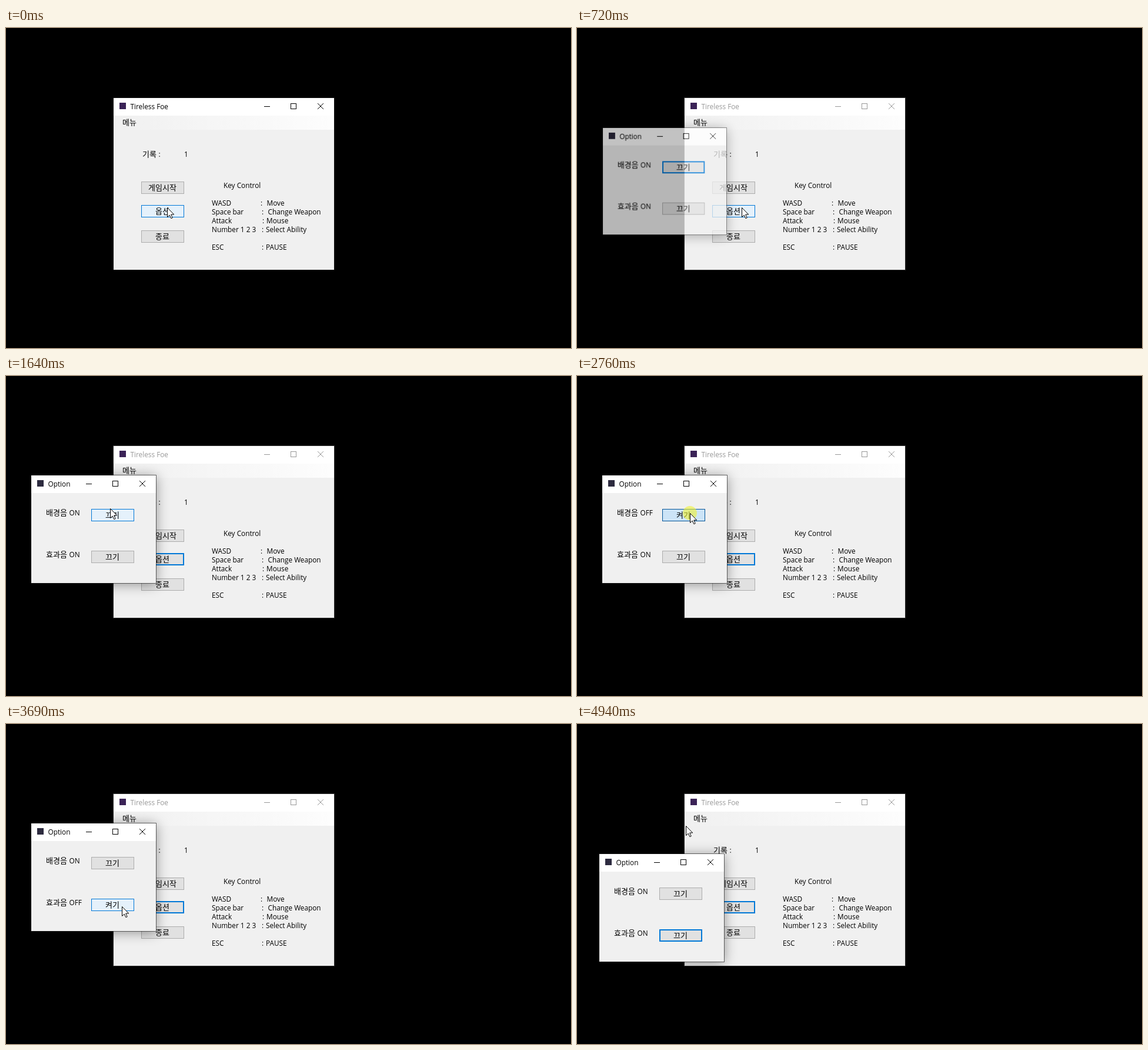
An HTML page with a canvas that plays this animation: 961 by 544 pixels, repeating every 5.01 s.

```html
<!DOCTYPE html>
<html lang="ko">
<head>
<meta charset="utf-8">
<title>Game menu</title>
<style>
html, body { margin: 0; width: 100%; height: 100%; overflow: hidden; background: #000; }
canvas { display: block; }
</style>
</head>
<body>
<canvas id="stage" width="961" height="544"></canvas>
<script>
const W = 961, H = 544, LOOP = 5010;
const stage = document.getElementById('stage');
const screen = stage.getContext('2d');
const layer = Object.assign(document.createElement('canvas'), { width: W, height: H });
const dialog = layer.getContext('2d');

const LATIN = '11.8px "Open Sans", "Noto Sans", sans-serif';
const HANGUL = '13px "Noto Sans CJK KR", "Noto Sans CJK", sans-serif';

// [fill, border, border width]
const BUTTON = {
  normal: ['#e1e1e1', '#adadad', 1],
  focus: ['#e1e1e1', '#0078d7', 2],
  hover: ['#e5f1fb', '#0078d7', 1],
  press: ['#cce4f7', '#005499', 1]
};

const START = {
  x: 274, y: 305, click: false, active: true, option: 'hover',
  alpha: 0, scale: 1, dx: 0, dy: 0,
  music: true, sound: true, musicButton: 'focus', soundButton: 'normal'
};

const at = (x, y, more) => ({ x, y, ...more });

// Each step holds until the next one.
const STEPS = [
  [260, at(276, 305)],
  [340, at(278, 305)],
  [410, at(280, 305)],
  [480, { click: true, option: 'press' }],
  [570, { click: false, option: 'hover' }],
  [650, { active: false, alpha: 0.35, scale: 0.96 }],
  [720, { alpha: 0.76, scale: 0.99 }],
  [800, { alpha: 0.96, scale: 0.998 }],
  [850, { alpha: 1, scale: 1 }],
  [1380, at(268, 300, { option: 'focus' })],
  [1450, at(240, 281)],
  [1510, at(210, 255)],
  [1570, at(186, 232, { musicButton: 'hover' })],
  [1640, at(177, 225)],
  [1710, at(181, 228)],
  [1770, at(187, 232)],
  [1840, at(190, 233)],
  [1910, { click: true, musicButton: 'press' }],
  [1970, { click: false, music: false, musicButton: 'hover' }],
  [2170, at(191, 233)],
  [2370, at(192, 233)],
  [2760, { click: true, musicButton: 'press' }],
  [2900, { click: false, music: true, musicButton: 'hover' }],
  [2960, at(195, 255, { musicButton: 'focus' })],
  [3030, at(197, 275)],
  [3090, at(198, 289)],
  [3230, at(198, 300, { soundButton: 'hover' })],
  [3300, at(197, 310)],
  [3430, { click: true, musicButton: 'normal', soundButton: 'press' }],
  [3550, { click: false, sound: false }],
  [3690, { soundButton: 'hover' }],
  [3750, { click: true, soundButton: 'press' }],
  [3880, { click: false, sound: true, soundButton: 'hover' }],
  [4010, at(190, 292, { soundButton: 'focus' })],
  [4080, at(175, 270)],
  [4140, at(156, 250)],
  [4210, at(138, 232)],
  [4280, at(127, 212)],
  [4340, at(118, 195)],
  [4410, at(113, 186)],
  [4610, { click: true }],
  [4680, at(109, 208, { dx: -4, dy: 22 })],
  [4740, at(107, 230, { dx: -6, dy: 44 })],
  [4800, at(108, 238, { dx: -5, dy: 52 })],
  [4870, at(142, 207, { click: false })],
  [4940, at(185, 173)]
];

function stateAt(time) {
  const state = { ...START };
  for (const [when, change] of STEPS) {
    if (when > time) break;
    Object.assign(state, change);
  }
  return state;
}

function text(c, str, x, y, font = LATIN, color = '#000', align = 'left') {
  c.font = font;
  c.fillStyle = color;
  c.textAlign = align;
  c.fillText(str, x, y);
}

function box(c, color, x, y, w, h) {
  c.fillStyle = color;
  c.fillRect(x, y, w, h);
}

function button(c, label, x, y, mode) {
  const [fill, border, line] = BUTTON[mode];
  box(c, border, x, y, 73, 21);
  box(c, fill, x + line, y + line, 73 - 2 * line, 21 - 2 * line);
  text(c, label, x + 36, y + 15, HANGUL, '#000', 'center');
}

function frame(c, title, x, y, w, h, icon, active, ink) {
  c.save();
  c.shadowColor = 'rgba(0,0,0,.42)';
  c.shadowBlur = 20;
  c.shadowOffsetY = 2;
  box(c, '#f0f0f0', x, y, w, h);
  c.restore();
  box(c, '#fff', x, y, w, 30);
  c.lineWidth = 1;
  c.strokeStyle = active ? 'rgba(20,20,20,.6)' : 'rgba(60,60,60,.75)';
  c.strokeRect(x - 0.5, y - 0.5, w + 1, h + 1);

  box(c, icon, x + 10, y + 8, 11, 11);
  text(c, title, x + 28.5, y + 19, LATIN, ink);

  const right = x + w;
  c.strokeStyle = ink;
  c.strokeRect(right - 73.5, y + 9.5, 9, 9);
  c.beginPath();
  c.moveTo(right - 119, y + 14.5);
  c.lineTo(right - 109, y + 14.5);
  c.moveTo(right - 28, y + 9);
  c.lineTo(right - 18, y + 19);
  c.moveTo(right - 18, y + 9);
  c.lineTo(right - 28, y + 19);
  c.stroke();
}

function drawMain(c, s) {
  frame(c, 'Tireless Foe', 183, 119, 375, 292, '#3b2357', s.active, s.active ? '#000' : '#999');

  const menu = c.createLinearGradient(183, 0, 558, 0);
  menu.addColorStop(0, '#f0f0f0');
  menu.addColorStop(1, '#fdfdfd');
  box(c, menu, 183, 149, 375, 24);
  text(c, '메뉴', 198, 165, HANGUL);

  text(c, '기록', 232, 219, HANGUL);
  text(c, ':', 259.5, 219);
  text(c, '1', 303, 219);

  button(c, '게임시작', 230, 261, 'normal');
  button(c, '옵션', 230, 301, s.option);
  button(c, '종료', 230, 344, 'normal');

  text(c, 'Key Control', 370, 272);
  const keys = [
    ['WASD', 433, 'Move', 443.5, 302],
    ['Space bar', 435, 'Change Weapon', 445.5, 317],
    ['Attack', 436, 'Mouse', 443, 332],
    ['Number 1 2 3', 435, 'Select Ability', 442, 347],
    ['ESC', 435, 'PAUSE', 442, 377]
  ];
  for (const [key, colonX, action, actionX, y] of keys) {
    text(c, key, 350, y);
    text(c, ':', colonX, y);
    text(c, action, actionX, y);
  }
}

function drawSetting(c, label, on, y, mode) {
  text(c, label, 68, y, HANGUL);
  text(c, on ? 'ON' : 'OFF', 107.5, y);
  button(c, on ? '끄기' : '켜기', 145, y - 11, mode);
}

function drawDialog(c, s) {
  c.clearRect(0, 0, W, H);
  c.save();
  c.translate(s.dx, s.dy);
  frame(c, 'Option', 43, 169, 212, 183, '#2d2b3f', true, '#000');
  drawSetting(c, '배경음', s.music, 237, s.musicButton);
  drawSetting(c, '효과음', s.sound, 308, s.soundButton);
  c.restore();
}

function drawCursor(c, { x, y, click }) {
  if (click) {
    c.fillStyle = 'rgba(238,242,50,.6)';
    c.beginPath();
    c.arc(x, y, 12, 0, Math.PI * 2);
    c.fill();
  }
  const arrow = new Path2D('M0 0V16L3.7 12.6L6.4 18.2L8.7 17.2L6.2 11.5H11.2Z');
  c.save();
  c.translate(x + 0.5, y + 0.5);
  c.fillStyle = '#fff';
  c.strokeStyle = '#000';
  c.lineWidth = 1;
  c.fill(arrow);
  c.stroke(arrow);
  c.restore();
}

function draw(time) {
  const s = stateAt(time);
  box(screen, '#000', 0, 0, W, H);
  drawMain(screen, s);
  if (s.alpha > 0) {
    drawDialog(dialog, s);
    screen.save();
    screen.globalAlpha = s.alpha;
    screen.translate(149, 260.5);
    screen.scale(s.scale, s.scale);
    screen.drawImage(layer, -149, -260.5);
    screen.restore();
  }
  drawCursor(screen, s);
}

const begin = performance.now();
function tick() {
  draw((performance.now() - begin) % LOOP);
  requestAnimationFrame(tick);
}
tick();
</script>
</body>
</html>
```
